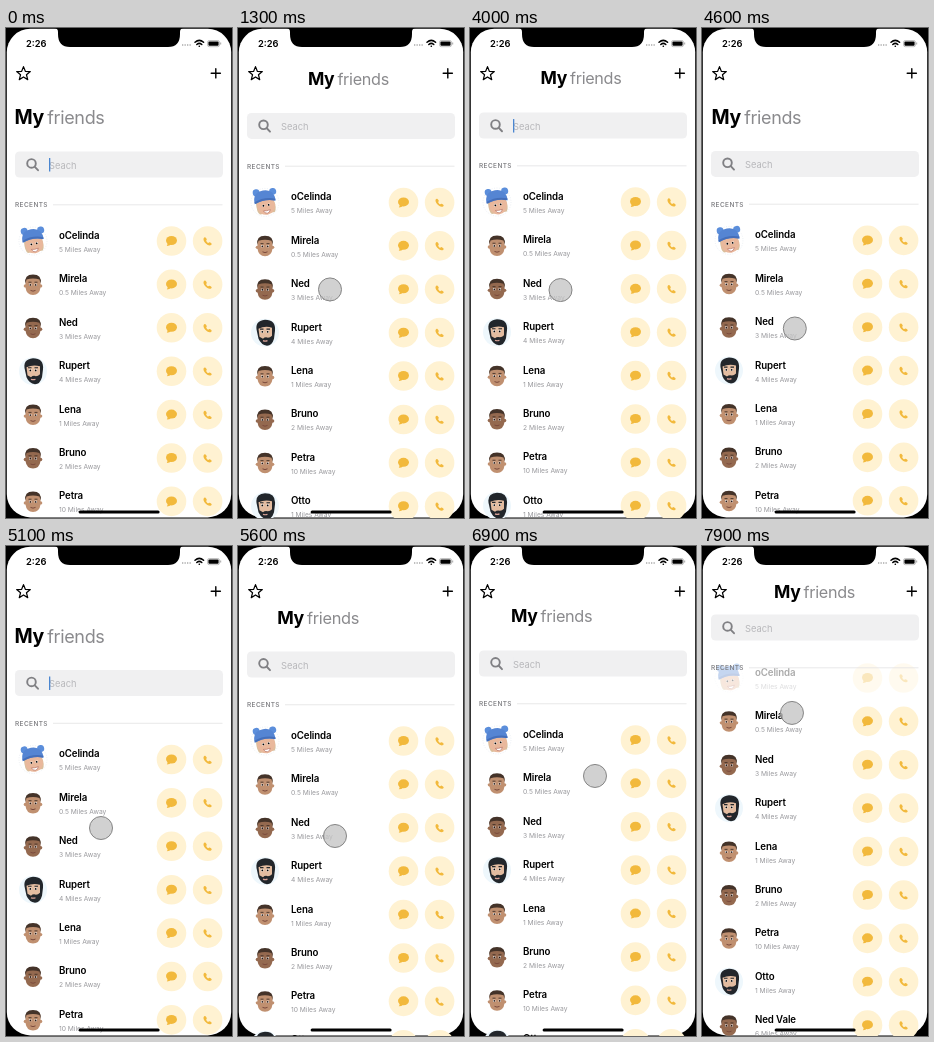
These frames come from a looping animation (226 by 490 pixels, 8000 ms). An HTML page:

```html
<!DOCTYPE html>
<html lang="en">
<head>
<meta charset="utf-8">
<title>My friends</title>
<style>
html, body { margin: 0; width: 100%; height: 100%; overflow: hidden; background: #000; }
svg { display: block; width: 100vw; height: 100vh; font-family: Inter, Roboto, sans-serif; }
.title { font-size: 19.5px; font-weight: 700; letter-spacing: -.4px; }
.light { font-size: 18px; font-weight: 400; fill: #8a8a8d; letter-spacing: -.35px; }
.name { font-size: 9.7px; font-weight: 600; letter-spacing: -.12px; }
.away { font-size: 6.7px; fill: #98989c; }
.label { font-size: 6.5px; font-weight: 500; letter-spacing: .4px; fill: #77777b; }
.clock { font-size: 9.3px; font-weight: 600; }
.hint { font-size: 9.3px; fill: #b8b8bb; }
.line { fill: none; stroke: #000; stroke-linecap: round; stroke-linejoin: round; }
</style>
</head>
<body>
<svg viewBox="0 0 226 490">
  <defs>
    <g id="eyes">
      <path d="M-4-.6h2.4M1.6-.6h2.4" stroke="#fff" stroke-width="2"/>
      <circle cx="-2.7" cy="-.5" r=".9"/><circle cx="2.7" cy="-.5" r=".9"/>
    </g>
    <g id="hat">
      <circle r="14" fill="none" stroke="#e3e9ef" stroke-width=".7" stroke-dasharray="1 1.5"/>
      <g transform="rotate(-10)">
        <path d="M-9-1Q-10 9-7 11H8Q11 7 9-1Z" fill="#d9bf9c"/>
        <ellipse cx=".5" cy="3.5" rx="9" ry="9" fill="#e9b89c"/>
        <circle cx="-7" cy="-11" r="3.5" fill="#5b8edb"/><circle cx="9.500" cy="-9.500" r="3.500" fill="#5b8edb"/>
        <path d="M-10.500 0Q-11-12 0-12T11 0Q0-4-10.500 0Z" fill="#5585d3"/>
        <path d="M-10-1Q0-5 10.500-1" fill="none" stroke="#456fba" stroke-width="2"/>
        <use href="#eyes" y="3.500" x=".5"/>
        <path d="M-3 8Q0 9 4 8Q3 11 .5 11T-3 8" fill="#fff" stroke="#a85a50" stroke-width=".5"/>
      </g>
    </g>
    <g id="plain">
      <circle cx="-7.600" cy="1.500" r="1.700"/><circle cx="7.600" cy="1.500" r="1.700"/>
      <path d="M-7.500-4Q-7-9 0-9T7.500-4V3Q6.500 10.500 0 10.500T-7.500 3Z"/>
      <path d="M-7.600-1Q-9-10 0-10T7.600-1L6.500-5Q0-7-6.500-5Z" fill="#443329"/>
      <path d="M-4.500-2.200h3M1.500-2.200h3" stroke="#443329" stroke-width=".9"/>
      <use href="#eyes" y="1" fill="#2a1a14"/>
      <path d="M-2.500 6Q0 7.500 2.500 6" fill="none" stroke="#7b4a3c"/>
    </g>
    <g id="tan" fill="#c09070"><use href="#plain"/></g>
    <g id="brown" fill="#94694f"><use href="#plain"/></g>
    <g id="beard">
      <circle r="14" fill="#eef7fc"/>
      <path d="M-8-1Q-11-12 0-13Q11-13 10-2L9 6Q7 13 2 13Q-4 12-6.500 6Z" fill="#22262b"/>
      <path d="M-6.500-4Q0-7 7-5L7 3Q5 5 3 5Q0 4-2 6L-5.500 4Z" fill="#e3bca0"/>
      <path d="M-5-3.500h3.500M1.500-3.500H5" stroke="#22262b" stroke-width="1.100"/>
      <use href="#eyes" y="-.3"/>
      <path d="M-2 8Q0 9 2.500 8" fill="none" stroke="#d8a196" stroke-width="1.200"/>
    </g>
    <g id="actions">
      <g fill="#fff2d2"><circle cx="165.500" r="14.800"/><circle cx="201.600" r="14.800"/></g>
      <g fill="#f2b93c">
        <ellipse cx="165.500" cy="-.5" rx="5.500" ry="4.500"/>
        <path d="M161.500 1.300Q162 3.800 160.800 5Q163.800 4.900 165 3.300Z"/>
        <path transform="translate(201.600 .3)" d="M-3.800-3.400C-3-4.600-2-4.200-.9-2.200C-.6-1.600-1.400-1-1.400-.5C-1 .6 0 1.500 .7 1.600C1.200 1.500 1.600 .7 2.200 1C4.300 2 4.600 3 3.400 3.800C.5 5.600-5.600-.6-3.800-3.400Z"/>
      </g>
    </g>
  </defs>

  <rect x=".8" y=".8" width="224.400" height="488.600" rx="23.500" fill="#fff"/>
  <g id="list"></g>

  <g id="search">
    <rect x="9" y="123.500" width="208" height="26" rx="4.500" fill="#f0f0f1"/>
    <g class="line" style="stroke:#808084;stroke-width:1.900">
      <circle cx="25.500" cy="135.400" r="4.300"/><path d="M28.800 138.800L32 142.200"/>
    </g>
    <text class="hint" x="43" y="140.600">Seach</text>
    <rect id="caret" x="43" y="130" width="1.300" height="13.500" fill="#4a86d0"/>
    <text class="label" x="9" y="179.100">RECENTS</text>
    <path d="M47 176.800H216.500" stroke="#e2e2e4" stroke-width=".8"/>
  </g>

  <text id="title" class="title" y="96.300"><tspan x="8.500">My</tspan><tspan class="light" x="41.300">friends</tspan></text>

  <path id="star" class="line" stroke-width="1.200"/>
  <path class="line" stroke-width="1.400" d="M205.200 45.300h9.200M209.800 40.700v9.200"/>

  <circle id="touch" r="11.500" fill="#c4c4c4" fill-opacity=".78" stroke="#858585" stroke-width="1"/>

  <path d="M48 0Q52 0 52 4V6Q52 19 64 19H162Q174 19 174 6V4Q174 0 178 0Z"/>
  <text class="clock" x="20" y="18.800">2:26</text>
  <path d="M176 17h9" stroke="#aaa" stroke-width="1.300" stroke-dasharray="1.300 1.200"/>
  <g class="line" stroke-width="1.500">
    <path d="M189 14.300Q193.300 10.500 197.600 14.300M190.800 16.500Q193.300 14.300 195.800 16.500M193.200 18.300h.2"/>
  </g>
  <rect x="201.500" y="12.500" width="12" height="6.200" rx="1.800" fill="none" stroke="#999" stroke-width=".6"/>
  <rect x="202.400" y="13.400" width="10.200" height="4.400" rx="1"/>
  <path d="M214.700 14.500v2" stroke="#999" stroke-width=".9"/>
  <rect x="72.600" y="482.500" width="81" height="3" rx="1.500"/>
</svg>

<script>
const LOOP = 8000, PITCH = 43.4, BLINK = 1060;
const $ = id => document.getElementById(id);
const clamp = (v, lo = 0, hi = 1) => Math.min(hi, Math.max(lo, v));

const friends = [
  ["oCelinda", 5, "hat"], ["Mirela", 0.5, "tan"], ["Ned", 3, "brown"],
  ["Rupert", 4, "beard"], ["Lena", 1, "tan"], ["Bruno", 2, "brown"],
  ["Petra", 10, "tan"], ["Otto", 1, "beard"], ["Ned Vale", 6, "brown"]
];
$("list").innerHTML = friends.map(([name, miles, face]) => `<g>
  <use href="#${face}" x="27"/>
  <text class="name" x="53" y="-2">${name}</text>
  <text class="away" x="53" y="11">${miles} Miles Away</text>
  <use href="#actions"/></g>`).join("");
const rows = [...$("list").children];

const points = Array.from({length: 10}, (_, i) => {
  const a = (i / 5 - 0.5) * Math.PI, r = i % 2 ? 3.1 : 7.2;
  return `${17.5 + r * Math.cos(a)} ${45.8 + r * Math.sin(a)}`;
});
$("star").setAttribute("d", `M${points.join("L")}Z`);

// time, scroll, finger x, finger y, finger opacity
const keys = [
  [0, 0, 92, 300, 0], [700, 0, 92, 300, 0], [800, 0, 92, 300, 1],
  [1500, 48, 92, 252, 1], [2250, 0, 94, 300, 1], [2400, 0, 94, 300, 0],
  [3000, 0, 88, 301, 0], [3100, 0, 88, 301, 1], [3750, 46, 89, 255, 1],
  [4000, 39, 90.5, 262, 1], [4650, 0, 93, 301, 1], [5100, -0.5, 95, 282, 1],
  [5600, 18, 97, 290, 1], [6100, 43, 99, 265, 1], [6600, 10, 117, 239, 1],
  [6900, 19, 125, 230, 1], [7900, 81, 90, 167, 1], [8001, 86, 87, 162, 1]
];

const slope = (n, i) => keys[n] && keys[n + 1]
  ? (keys[n + 1][i] - keys[n][i]) / (keys[n + 1][0] - keys[n][0]) : 0;

// the motion runs on through a key and halts only where it turns
function tangent(n, i) {
  const a = slope(n - 1, i), b = slope(n, i);
  return a * b > 0 ? 2 * a * b / (a + b) : 0;
}

function poseAt(t) {
  const n = keys.findIndex(k => k[0] > t) - 1, a = keys[n], b = keys[n + 1];
  const span = b[0] - a[0], p = (t - a[0]) / span, q = 1 - p;
  return [1, 2, 3, 4].map(i =>
    a[i] + (b[i] - a[i]) * p * p * (3 - 2 * p) +
    span * p * q * (tangent(n, i) * q - tangent(n + 1, i) * p));
}

const place = (el, x, y, scale = 1) =>
  el.setAttribute("transform", `translate(${x} ${y}) scale(${scale})`);

function draw(now) {
  const t = now % LOOP;
  const [scroll, x, y, alpha] = poseAt(t);
  const pinned = Math.min(scroll, 55);

  place($("search"), 0, -pinned);
  rows.forEach((row, i) => {
    const top = i * PITCH - scroll;
    place(row, 0, 213 + top);
    // rows fade out as they slide beneath the pinned label
    row.setAttribute("opacity", clamp((39 + top + pinned) / 39));
  });

  const scale = 1 - 0.1 * clamp(scroll / 20);
  const cx = 54 + 59 * clamp(scroll / 40), cy = 88 - Math.min(scroll, 43.5);
  place($("title"), cx - 54 * scale, cy - 88 * scale, scale);

  const phase = t / BLINK % 1;
  $("caret").setAttribute("opacity", phase < 0.3 ? clamp((0.12 - phase) / 0.08) : clamp((phase - 0.51) / 0.035));

  place($("touch"), x, y);
  $("touch").setAttribute("opacity", alpha);
}

const start = performance.now();
function tick() {
  draw(performance.now() - start);
  requestAnimationFrame(tick);
}
tick();
</script>
</body>
</html>
```
